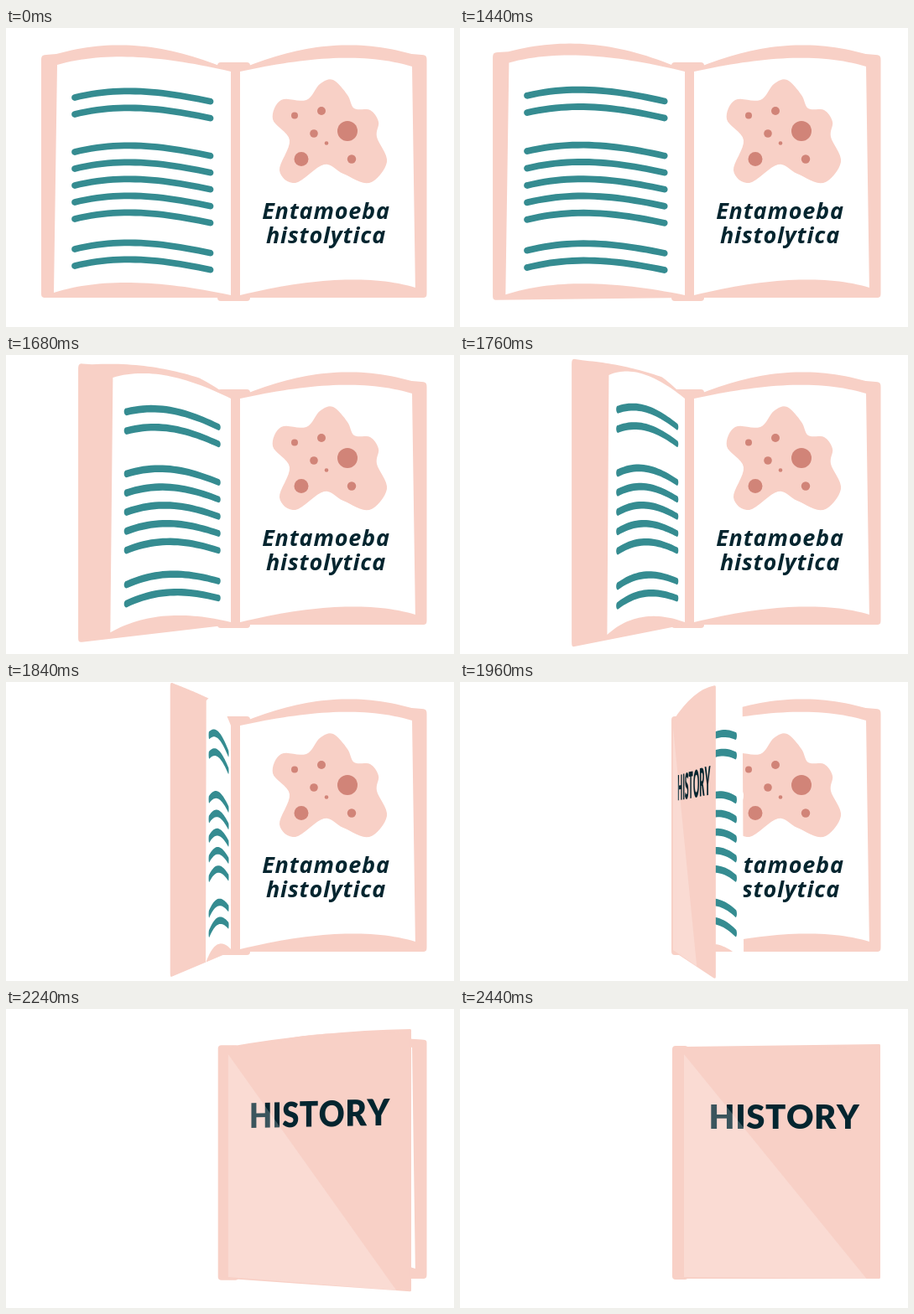
Recreate the animation shown at these times as an HTML page with a canvas. Size 534x357 px, loop 4000 ms.

```html
<!DOCTYPE html>
<html lang="en">
<head>
<meta charset="utf-8">
<title>Closing book</title>
<style>
  html, body { margin: 0; width: 100%; height: 100%; overflow: hidden; background: #fff; }
  canvas { display: block; width: 534px; height: 357px; }
</style>
</head>
<body>
<canvas id="stage"></canvas>
<script>
const W = 534, H = 357, LOOP = 4000, STEP = 40, START = 1400, STEPS = 26;
const PEACH = '#f8d0c6', TEAL = '#358c91', INK = '#04252f', SPOT = '#d18478';
const HINGE = 268, DEPTH = 1310;
const canvas = document.getElementById('stage');
const ctx = canvas.getContext('2d');
const dpr = window.devicePixelRatio || 1;
canvas.width = W * dpr;
canvas.height = H * dpr;

// Perspective swing of a flat panel about its hinge
function swing(x0, x1, y0, y1, hx, X, dTop, dBottom) {
  const s = 1 + (dBottom - dTop) / (y1 - y0);
  return ([x, y]) => {
    const f = (x - x0) / (x1 - x0);
    const g = f / (1 - f * (1 - 1 / s)) / s;
    return [hx + g * (X - hx), y + g * (dTop + (dBottom - dTop) * (y - y0) / (y1 - y0))];
  };
}

// Outer edge of a panel: its x and how much nearness enlarges it
function edge(radius, angle) {
  const scale = 1 / (1 - radius / DEPTH * Math.sin(angle));
  return { x: HINGE - radius * Math.cos(angle) * scale, grow: scale - 1 };
}

function bezier(a, b, c, d, n = 32) {
  return Array.from({ length: n + 1 }, (_, i) => {
    const t = i / n, r = 1 - t;
    return [0, 1].map(k => r * r * r * a[k] + 3 * r * r * t * b[k] + 3 * r * t * t * c[k] + t * t * t * d[k]);
  });
}

function fill(points, color) {
  ctx.beginPath();
  points.forEach(p => ctx.lineTo(p[0], p[1]));
  ctx.closePath();
  ctx.fillStyle = color;
  ctx.fill();
}

const cover = [
  [268, 51], ...bezier([254, 45], [185, 18], [125, 13], [60, 31]),
  ...bezier([48, 32], [43, 32], [42, 34], [42, 38], 6),
  ...bezier([42, 317], [42, 321], [43, 322], [47, 322], 6), [268, 322]
];
const page = [
  ...bezier([268, 52], [190, 34], [120, 27], [61, 44]),
  ...bezier([57, 316], [110, 299], [180, 300], [268, 319])
];
const rightCover = cover.map(([x, y]) => [543.5 - x, y]);
const rightPage = page.map(swing(268, 60, 44, 316, 279, 485, 2, -6));

// Rounded bar following a shallow arch
function bar(y) {
  const r = 3.9, mid = bezier([82, y], [135, y - 13], [185, y - 8], [243.5, y + 4.7], 24);
  const cap = ([x, cy], from) => Array.from({ length: 9 }, (_, i) => {
    const a = from + Math.PI * i / 8;
    return [x + r * Math.cos(a), cy + r * Math.sin(a)];
  });
  return [
    ...mid.map(([x, v]) => [x, v - r]), ...cap(mid[mid.length - 1], -Math.PI / 2),
    ...mid.map(([x, v]) => [x, v + r]).reverse(), ...cap(mid[0], Math.PI / 2)
  ];
}
const paragraph = (y, count) => Array.from({ length: count }, (_, i) => bar(y + 20 * i));
const bars = [...paragraph(83, 2), ...paragraph(148, 5), ...paragraph(264, 2)];

const blob = [
  [390, 62], [407, 80], [415, 96], [434, 98], [444, 112], [442, 130], [454, 160], [433, 185], [402, 174],
  [379, 163], [345, 185], [326, 170], [338, 134], [318, 109], [328, 86], [358, 86], [374, 67]
];
const spots = [
  [344, 104.5, 4], [376, 99, 5], [367, 126, 4.8], [407, 123, 12],
  [382, 137.5, 2.3], [352, 156.5, 8.5], [412, 156.5, 5.2]
];

function drawBlob() {
  const n = blob.length, at = i => blob[(i + n) % n];
  const toward = (p, a, b) => [0, 1].map(k => p[k] + (b[k] - a[k]) / 6);
  const points = blob.flatMap((b, i) => {
    const a = at(i - 1), c = at(i + 1), d = at(i + 2);
    return bezier(b, toward(b, a, c), toward(c, d, b), c, 8);
  });
  fill(points, PEACH);
  ctx.fillStyle = SPOT;
  for (const [x, y, r] of spots) {
    ctx.beginPath();
    ctx.arc(x, y, r, 0, 7);
    ctx.fill();
  }
}

function drawRightCover(angle) {
  const arch = Math.cos(angle) > 0 ? 1 : Math.min(1, 1.3 * Math.sin(angle));
  fill(rightCover.map(([x, y]) => [x, y < 46 ? 46 - (46 - y) * arch : y]), PEACH);
}

function drawRightPage() {
  fill(rightPage, '#fff');
  drawBlob();
  ctx.fillStyle = INK;
  ctx.font = 'italic 700 27px "Open Sans", sans-serif';
  ctx.textAlign = 'center';
  ctx.letterSpacing = '0.8px';
  ctx.fillText('Entamoeba', 381.5, 228);
  ctx.fillText('histolytica', 381.5, 257);
}

function drawSpine(shut) {
  const q = shut * shut;
  ctx.fillStyle = PEACH;
  ctx.beginPath();
  ctx.roundRect(252 + q, 41 + 3 * q, 39 - 20 * q, 285 - 6 * q, 4);
  ctx.fill();
}

function drawBack(angle, { x, grow }) {
  const arch = Math.cos(angle) ** 2;
  const bend = swing(HINGE, 42, 32, 322, HINGE, x, -160 * grow, 153 * grow);
  fill(cover.map(([px, y]) => bend([px, y < 32 ? 32 - (32 - y) * arch : y])), PEACH);
}

function drawLeftPage(angle) {
  const lead = 0.15 * Math.min(1, 2 * Math.sin(angle));
  const { x, grow } = edge(208, angle + lead);
  const bend = (up, down) => swing(HINGE, 60, 44, 316, HINGE, x, -up * grow, down * grow);
  fill(page.map(bend(117, 103)), '#fff');
  bars.forEach(b => fill(b.map(bend(160, 135)), TEAL));
}

function drawTitle(bend) {
  ctx.font = '900 40px Lato, sans-serif';
  ctx.textAlign = 'left';
  ctx.letterSpacing = '0px';
  ctx.fillStyle = INK;
  let x = 296.5;
  for (const ch of 'HISTORY') {
    const w = ctx.measureText(ch).width, base = 142.5;
    const a = bend([x, base]), b = bend([x + w, base]);
    const m = bend([x + w / 2, base]), top = bend([x + w / 2, base - 29]);
    ctx.save();
    ctx.transform((b[0] - a[0]) / w, (b[1] - a[1]) / w, 0, (m[1] - top[1]) / 29, a[0], a[1]);
    ctx.fillText(ch, 0, 0);
    ctx.restore();
    x += w + 0.6;
  }
}

function drawFront(angle, p, hx, shut, { x, grow }) {
  const top = 32 + 10 * p - 160 * grow, bottom = 322 + 153 * grow, hy = 45, r = 1.5;
  ctx.beginPath();
  ctx.moveTo(hx + r, hy + r);
  ctx.quadraticCurveTo((hx + x) / 2, (hy + top) / 2 - 16 * Math.sin(angle) + r, x - r, top + r);
  ctx.lineTo(x - r, bottom - r);
  ctx.lineTo(hx + r, 322 - r);
  ctx.closePath();
  ctx.fillStyle = ctx.strokeStyle = PEACH;
  ctx.lineWidth = 2 * r;
  ctx.lineJoin = 'round';
  ctx.fill();
  ctx.stroke();

  drawTitle(swing(267, 501, 42, 322, hx, x, (top - 42) * 0.85, bottom - 322));

  const reach = 0.93 - 0.5 * (1 - shut) ** 2;
  const foot = [hx + (x - hx) * reach, 322 + (bottom - 322) * reach];
  fill([[hx, 54], foot, [hx, 320]], 'rgba(255,255,255,0.22)');
}

function draw(time) {
  const step = Math.floor((time % LOOP - START) / STEP);
  const p = Math.max(0, Math.min(1, step / STEPS));
  const angle = Math.PI * p - 0.06 * Math.sin(2 * Math.PI * p);
  const shut = Math.max(0, -Math.cos(angle));
  const outer = edge(226 + 7 * p ** 4, angle);
  const hx = 252 + 15 * shut;
  const closed = p === 1, front = outer.x > hx;

  ctx.setTransform(dpr, 0, 0, dpr, 0, 0);
  ctx.fillStyle = '#fff';
  ctx.fillRect(0, 0, W, H);
  if (!closed) drawRightCover(angle);
  drawSpine(shut);
  if (!closed) drawRightPage();
  if (!front) drawBack(angle, outer);
  if (!closed) drawLeftPage(angle);
  if (front) drawFront(angle, p, hx, shut, outer);
}

const begin = performance.now();
function tick() {
  draw(performance.now() - begin);
  requestAnimationFrame(tick);
}
tick();
</script>
</body>
</html>
```
